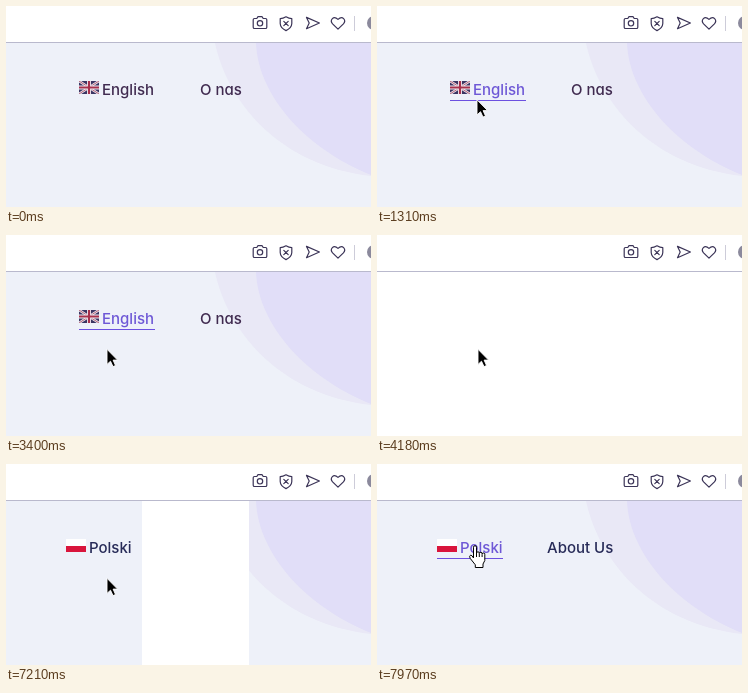
Animation of 365x201 px, one loop 8 s. Source, as an HTML page:

```html
<!DOCTYPE html>
<html lang="en">
<head>
<meta charset="utf-8">
<title>Language switch</title>
<style>
  html, body { margin: 0; width: 100%; height: 100%; overflow: hidden; background: #fff; }
  svg { display: block; width: 100%; height: 100%; }
  text { font: 500 15px Inter, "Open Sans", sans-serif; font-feature-settings: "cv11"; }
  .icons { fill: none; stroke: #3b3457; stroke-width: 1.2; stroke-linejoin: round; stroke-linecap: round; }
  #polish { --ink: #402b50; }
  #english { --ink: #272b58; }
  #polish text, #english text { fill: var(--ink); }
  .link rect.line { fill: #6c50e0; visibility: hidden; }
  .link.hover rect.line { visibility: visible; }
  #stage .link.hover text { fill: #6e58d6; }
</style>
</head>
<body>
<svg id="stage" viewBox="0 0 365 201">
  <rect width="365" height="201" fill="#eef1f9"/>
  <path d="M209 37C222 98 275 160 365 170V37Z" fill="#e9e8f6"/>
  <path d="M250 37C252 90 300 143 365 169V37Z" fill="#e1def8"/>

  <g id="polish">
    <g class="link">
      <svg x="73" y="75" width="20" height="13" viewBox="0 0 20 13">
        <rect width="20" height="13" fill="#3b3563"/>
        <path d="M0 0L20 13M20 0L0 13" stroke="#e9e6ee" stroke-width="2.4"/>
        <path d="M0 0L20 13M20 0L0 13" stroke="#a8405a" stroke-width=".8"/>
        <path d="M10 0V13M0 6.5H20" stroke="#f1eef4" stroke-width="4"/>
        <path d="M10 0V13M0 6.5H20" stroke="#a8304c" stroke-width="2.2"/>
      </svg>
      <text x="96" y="89">English</text>
      <rect class="line" x="73" y="94" width="76" height="1"/>
    </g>
    <text x="194" y="89">O nas</text>
  </g>

  <g id="english">
    <g class="link">
      <rect x="60" y="75" width="20" height="7" fill="#fff"/>
      <rect x="60" y="82" width="20" height="6" fill="#d9153c"/>
      <text x="83" y="89">Polski</text>
      <rect class="line" x="60" y="94" width="66" height="1"/>
    </g>
    <text x="170" y="89">About Us</text>
  </g>

  <g id="panels" fill="#fff">
    <rect x="-248" y="37" height="164"/>
    <rect x="136" y="37" height="164"/>
  </g>

  <rect width="365" height="36" fill="#fff"/>
  <rect y="36" width="365" height="1" fill="#b9b9cd"/>
  <g class="icons">
    <path d="M248.5 12.5H250.8L252 10.7H256L257.2 12.5H259.5Q260.8 12.5 260.8 13.8V21.2Q260.8 22.5 259.5 22.5H248.5Q247.2 22.5 247.2 21.2V13.8Q247.2 12.5 248.5 12.5Z"/>
    <circle cx="254" cy="17.3" r="2.7"/>
    <path d="M280 10.8Q283 12.6 285.8 12.6V17.5Q285.6 22 280 24.6Q274.4 22 274.2 17.5V12.6Q277 12.6 280 10.8ZM277.8 15.3L282.2 19.7M282.2 15.3L277.8 19.7"/>
    <path d="M300.5 11.4L313.4 17L300.5 22.7L303.2 17Z"/>
    <path d="M332 23.2L326.6 17.8C323.4 14.2 327.4 9 332 13.4C336.6 9 340.6 14.2 337.4 17.8Z"/>
  </g>
  <rect x="348" y="10" width="1" height="15" fill="#cdccd9"/>
  <circle cx="368" cy="17" r="7" fill="#8b899c"/>

  <circle id="ring" cx="100" cy="88" r="12" fill="#ff0" fill-opacity=".47"/>
  <g id="cursor">
    <path id="arrow" d="M0 .3V15.4L3.5 12.2L6 17.6L8.5 16.5L6.1 11.1H10.6Z" stroke="#fff" stroke-width=".9"/>
    <g id="hand" fill="#fff" stroke="#000" stroke-linejoin="round">
      <path d="M-1.5 12V1.2a1.5 1.5 0 0 1 3 0V7a1.4 1.4 0 0 1 2.8 .4a1.4 1.4 0 0 1 2.8 .5a1.4 1.4 0 0 1 2.7 .9V14.5L8 18V21.5H.3V18.8L-4.8 12.4Q-6.2 9.8 -4.4 9.2Q-3 9 -1.5 12Z"/>
      <path d="M1.5 7V11M4.3 7.5V11M7.1 8.2V11" fill="none"/>
    </g>
  </g>
</svg>
<script>
const LOOP = 8000;
const $ = id => document.getElementById(id);
const show = (el, on) => el.setAttribute("visibility", on ? "visible" : "hidden");
const clamp = u => Math.min(1, Math.max(0, u));
const easeOut = u => 1 - (1 - u) ** 2;
const easeInOut = u => u < .5 ? 4 * u ** 3 : 1 - 4 * (1 - u) ** 3;

// The screen refreshes only at these times.
const ticks = [
  0, 840, 920, 1000, 1080, 1150, 1230, 1310, 1410, 1460, 1620, 1850,
  2950, 3020, 3100, 3170, 3250, 3320, 3400, 4180,
  6910, 6980, 7060, 7210, 7290, 7400, 7660, 7740, 7820, 7890, 7970
];

const moves = [
  { start: 840, end: 1460, from: [100, 182], to: [100, 88] },
  { start: 2880, end: 3400, from: [100, 88], to: [101, 114] },
  { start: 7590, end: 7970, from: [101, 114], to: [98, 82] }
];

const PAGE_CHANGE = 4180, PANEL_WIDTH = 384, PANEL_TIME = 600;
const panelStarts = [6791, 6857];
const panels = [...$("panels").children];
const links = [...document.querySelectorAll(".link")];

function pointer(t) {
  const move = moves.findLast(m => t >= m.start) || moves[0];
  const p = easeOut(clamp((t - move.start) / (move.end - move.start)));
  return move.from.map((a, i) => a + (move.to[i] - a) * p);
}

function draw(time) {
  const t = ticks.findLast(k => k <= time);
  const [x, y] = pointer(t);
  const second = t >= PAGE_CHANGE;
  const over = t >= 840 && y < 96;
  const pointing = y < 92;

  $("cursor").setAttribute("transform", `translate(${x} ${y})`);
  show($("arrow"), t >= 840 && !pointing);
  show($("hand"), t >= 840 && pointing);
  show($("ring"), t >= 1620 && t < 1850);

  $("polish").style.display = second ? "none" : "";
  $("english").style.display = second ? "" : "none";
  // The first link keeps its focus after the click.
  links[0].classList.toggle("hover", over || t >= 1620);
  links[1].classList.toggle("hover", over);

  panels.forEach((panel, i) => {
    const p = easeInOut(clamp((t - panelStarts[i]) / PANEL_TIME));
    panel.setAttribute("width", second ? Math.round(PANEL_WIDTH * (1 - p)) : 0);
  });
}

const begin = performance.now();
function frame() {
  draw((performance.now() - begin) % LOOP);
  requestAnimationFrame(frame);
}
frame();
</script>
</body>
</html>
```
